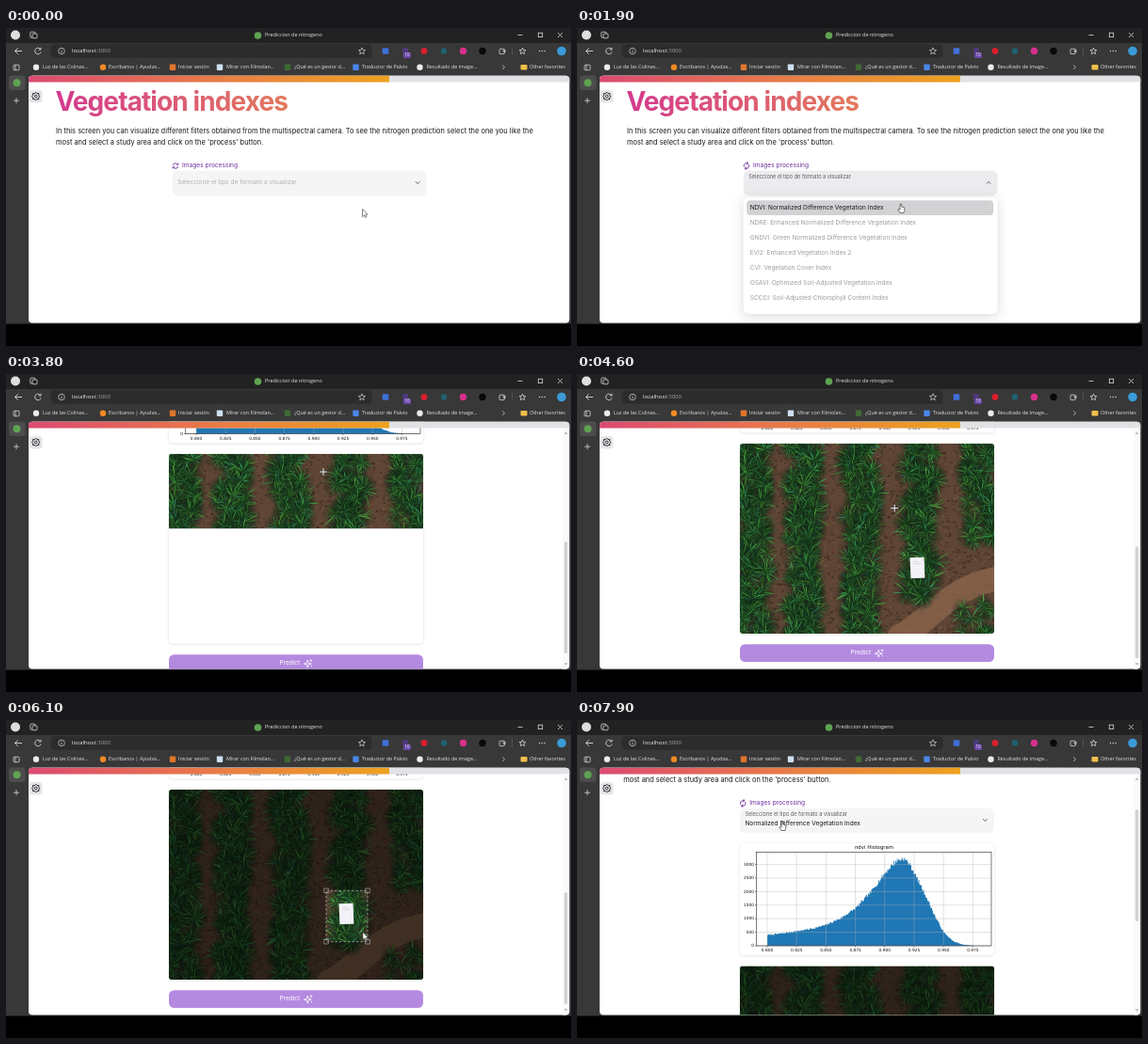
An HTML page with a canvas that plays this animation: 600x338 px, repeating every 8 s.

```html
<!DOCTYPE html>
<html lang="en">
<head>
<meta charset="utf-8">
<title>Vegetation indexes</title>
<style>
html, body { margin: 0; width: 100%; height: 100%; overflow: hidden; background: #000; }
canvas { display: block; width: 600px; height: 338px; }
</style>
</head>
<body>
<canvas id="stage"></canvas>
<script>
const W = 600, H = 338, LOOP = 8000;
const UI = '"Open Sans", "Noto Sans", sans-serif';
const INTER = 'Inter, sans-serif';
const PLOT = '"DejaVu Sans", sans-serif';
const dpr = window.devicePixelRatio || 1;

function makeCanvas(canvas, w, h) {
  canvas.width = Math.round(w * dpr);
  canvas.height = Math.round(h * dpr);
  const ctx = canvas.getContext('2d');
  ctx.scale(dpr, dpr);
  return ctx;
}
const g = makeCanvas(document.getElementById('stage'), W, H);

function seeded(seed) {
  return () => {
    seed = (seed * 1664525 + 1013904223) >>> 0;
    return seed / 4294967296;
  };
}

// ---- drawing helpers ----
function text(str, x, y, size, color, font = INTER, align = 'left', weight = 400) {
  g.font = `${weight} ${size}px ${font}`;
  g.textAlign = align;
  g.textBaseline = 'middle';
  g.fillStyle = color;
  g.fillText(str, x, y);
}
function box(x, y, w, h, r, fill, stroke) {
  g.beginPath();
  g.roundRect(x, y, w, h, r);
  if (fill) { g.fillStyle = fill; g.fill(); }
  if (stroke) { g.strokeStyle = stroke; g.stroke(); }
}
function disc(x, y, r, fill) {
  g.beginPath();
  g.arc(x, y, r, 0, 7);
  g.fillStyle = fill;
  g.fill();
}
function ring(x, y, r, color, a = 0, b = Math.PI * 2) {
  g.beginPath();
  g.arc(x, y, r, a, b);
  g.strokeStyle = color;
  g.stroke();
}
function line(color, width, ...p) {
  g.beginPath();
  g.moveTo(p[0], p[1]);
  for (let i = 2; i < p.length; i += 2) g.lineTo(p[i], p[i + 1]);
  g.strokeStyle = color;
  g.lineWidth = width;
  g.stroke();
}
function star(x, y, R, r, n, color, turn = -Math.PI / 2) {
  g.beginPath();
  for (let i = 0; i < n * 2; i++) {
    const a = turn + i * Math.PI / n, d = i % 2 ? r : R;
    g.lineTo(x + d * Math.cos(a), y + d * Math.sin(a));
  }
  g.closePath();
  g.strokeStyle = color;
  g.stroke();
}

// ---- motion ----
function track(keys, t, smooth) {
  let i = 1;
  while (i < keys.length - 1 && keys[i][0] < t) i++;
  const a = keys[i - 1], b = keys[i];
  let k = Math.min(1, Math.max(0, (t - a[0]) / (b[0] - a[0])));
  if (smooth) k = k * k * (3 - 2 * k);
  return a.slice(1).map((v, j) => v + (b[j + 1] - v) * k);
}
const SCROLL = [[0, 0], [2500, 0], [2850, 119], [3200, 119], [3600, 207], [3800, 234.5],
  [4000, 245.5], [6400, 245.5], [6700, 201.5], [7400, 58]];
const MOUSE = [[0, 379, 197], [400, 379, 197], [900, 360, 166], [1200, 356, 168], [1750, 344, 187],
  [2200, 344, 187], [2850, 340, 174], [3300, 340, 174], [3800, 337, 104], [4500, 337, 140], [5150, 340, 181]];
const DRAG = [[5150, 340, 181], [5400, 371, 213], [5850, 384, 236]];
const LEAVE = [[5850, 384, 236], [6350, 375, 224], [6900, 375, 224], [7800, 218, 108]];
const OPEN = 1000, PICK = 2100, PLOTTED = 2350, LOAD = 3500, GRAB = 5150, DROP = 5900;

const pointer = t => t < GRAB ? track(MOUSE, t, true)
  : t < 5850 ? track(DRAG, t) : track(LEAVE, t, true);

// ---- crop field ----
const FW = 270, FH = 202;
const field = document.createElement('canvas');
(function paintField() {
  const c = makeCanvas(field, FW, FH), rnd = seeded(42);
  const near = n => (rnd() - 0.5) * n;

  function plant(x, y, size) {
    const shade = c.createRadialGradient(x, y, 0, x, y, size * 0.9);
    shade.addColorStop(0, 'rgba(14,34,20,.65)');
    shade.addColorStop(1, 'rgba(14,34,20,0)');
    c.fillStyle = shade;
    c.fillRect(x - size, y - size, size * 2, size * 2);
    const turn = rnd() * 6, blades = 13;
    for (let b = 0; b < blades; b++) {
      const a = turn + b * 6.28 / blades + near(0.3), len = size * (0.5 + rnd() * 0.6);
      const bend = a + near(0.5), wide = 0.5 + rnd() * 0.5;
      const mx = x + Math.cos(a) * len * 0.5, my = y + Math.sin(a) * len * 0.5;
      const nx = -Math.sin(a) * wide, ny = Math.cos(a) * wide;
      const ex = x + Math.cos(bend) * len, ey = y + Math.sin(bend) * len;
      const hue = 105 + rnd() * rnd() * 65, light = 16 + rnd() * 38;
      c.fillStyle = `hsl(${hue} 48% ${light}%)`;
      c.beginPath();
      c.moveTo(x, y);
      c.quadraticCurveTo(mx + nx, my + ny, ex, ey);
      c.quadraticCurveTo(mx - nx, my - ny, x, y);
      c.fill();
    }
  }

  c.fillStyle = '#5f4535';
  c.fillRect(0, 0, FW, FH);
  for (let i = 0; i < 3000; i++) {
    c.fillStyle = rnd() < 0.6 ? 'rgba(30,24,16,.4)' : 'rgba(135,104,80,.3)';
    c.fillRect(rnd() * FW, rnd() * FH, 1 + rnd() * 2, 1 + rnd());
  }
  c.lineCap = 'round';
  c.strokeStyle = 'rgba(142,103,78,.75)';
  c.lineWidth = 26;
  c.beginPath();
  c.moveTo(170, 205);
  c.bezierCurveTo(205, 188, 222, 148, 285, 142);
  c.stroke();

  for (const [cx, end] of [[14, 212], [67, 212], [129, 212], [192, 168], [255, 106]]) {
    for (let y = -8; y < end; y += 5.5)
      for (let k = 0; k < 3; k++) plant(cx + near(32), y + near(8), 11 + rnd() * 7);
  }
  for (let i = 0; i < 14; i++) plant(252 + near(36), 184 + near(38), 13);

  c.translate(188.5, 132);
  c.rotate(-0.04);
  c.fillStyle = '#f4f2f8';
  c.fillRect(-7.5, -11, 15, 22);
  c.fillStyle = '#c9c3cc';
  c.fillRect(-4, -7, 5, 0.7);
  c.fillRect(-4, -4.5, 8, 0.7);
})();

// ---- histogram ----
const CURVE = [[202, 400], [218, 460], [233, 540], [250, 640], [264, 770], [280, 1020], [296, 1400], [312, 2000],
  [327, 2700], [338, 3120], [346, 3230], [352, 3060], [358, 2680], [370, 1850], [380, 1080],
  [389, 500], [399, 170], [409, 45], [421, 5]];
const bars = [], noise = seeded(7);
for (let x = 202; x < 421; x += 0.85) {
  const v = track(CURVE, x)[0];
  bars.push([x, v + (noise() - 0.5) * (v * 0.05 + 30) * Math.min(1, v / 300)]);
}

function histogram(top) {
  const y0 = top + 109, up = v => y0 - v * 0.0288;
  const L = 190.5, R = 440, T = top + 9.5;
  g.beginPath();
  g.moveTo(202, y0);
  for (const [x, v] of bars) { g.lineTo(x, up(v)); g.lineTo(x + 0.85, up(v)); }
  g.lineTo(421, y0);
  g.fillStyle = '#1f77b4';
  g.fill();
  text('ndvi Histogram', 315.5, top + 5, 5.4, '#111', PLOT, 'center');
  for (let i = 0; i < 8; i++) {
    const x = 202 + i * 31.2;
    line('rgba(176,176,176,.75)', 0.5, x, T, x, y0);
    line('#111', 0.5, x, y0, x, y0 + 1.5);
    text((0.8 + i * 0.025).toFixed(3), x, y0 + 5, 4.35, '#111', PLOT, 'center');
  }
  for (let v = 0; v <= 3000; v += 500) {
    line('rgba(176,176,176,.75)', 0.5, L, up(v), R, up(v));
    line('#111', 0.5, L - 1.5, up(v), L, up(v));
    text(String(v), L - 2.5, up(v), 4.35, '#111', PLOT, 'right');
  }
  g.lineWidth = 0.6;
  g.strokeStyle = '#222';
  g.strokeRect(L, T, R - L, y0 - T);
}

// ---- page ----
const ITEMS = ['NDVI: Normalized Difference Vegetation Index', 'NDRE: Enhanced Normalized Difference Vegetation Index',
  'GNDVI: Green Normalized Difference Vegetation Index', 'EVI2: Enhanced Vegetation Index 2',
  'CVI: Vegetation Cover Index', 'OSAVI: Optimized Soil-Adjusted Vegetation Index',
  'SCCCI: Soil-Adjusted Chlorophyll Content Index'];

function card(x, y, w, h) {
  g.save();
  g.shadowColor = 'rgba(0,0,0,.14)';
  g.shadowBlur = 3 * dpr;
  g.shadowOffsetY = 0.5 * dpr;
  box(x, y, w, h, 4, '#fff');
  g.restore();
}

function spinner(x, y, t) {
  g.save();
  g.translate(x, y);
  g.rotate(t / 1000 * Math.PI * 2);
  g.lineWidth = 0.9;
  for (let i = 0; i < 2; i++) {
    ring(0, 0, 2.8, '#6a2c9c', 0.2, 2.7);
    line('#6a2c9c', 0.8, -3.1, 3.1, -2.7, 1, -0.7, 1.4);
    g.rotate(Math.PI);
  }
  g.restore();
}

function select(x, y, t) {
  const open = t >= OPEN && t < PICK, picked = t >= PICK;
  const lift = picked ? 1 : Math.min(1, Math.max(0, (t - OPEN) / 200));
  box(x, y, 270, 26.5, 6, open ? '#ececee' : '#f5f5f6');
  text('Seleccione el tipo de formato a visualizar', x + 5.5, y + 12.7 - 6.1 * lift,
    6.52 - 0.92 * lift, lift > 0.5 ? '#5c5c64' : '#b0b0b6');
  if (picked) text('Normalized Difference Vegetation Index', x + 5.5, y + 16.5, 6.52, '#18181b');
  const d = open ? -1.2 : 1.2, cx = x + 260.5, cy = y + 12.7;
  line('#55555c', 0.9, cx - 2.2, cy - d, cx, cy + d, cx + 2.2, cy - d);
}

function menu(x, y, t) {
  const k = Math.min(1, (t - OPEN) / 150) * Math.min(1, (PICK + 100 - t) / 100);
  g.save();
  g.globalAlpha = k;
  g.save();
  g.shadowColor = 'rgba(0,0,0,.15)';
  g.shadowBlur = 12 * dpr;
  g.shadowOffsetY = 2 * dpr;
  box(x, y, 270, 124, 6, '#fff');
  g.restore();
  const hover = t > 1500;
  if (hover) box(x + 3.5, y + 3.3, 262, 15.7, 4, '#d2d2d5');
  ITEMS.forEach((s, i) => text(s, x + 7, y + 11 + i * 16, 6.52, hover && i === 0 ? '#18181b' : '#9c9ca2'));
  g.restore();
}

function sparkles(x, y) {
  g.lineWidth = 0.8;
  star(x - 0.7, y + 0.6, 4, 1.2, 4, '#fff');
  line('#fff', 0.7, x + 3, y - 4.2, x + 3, y - 1.4);
  line('#fff', 0.7, x + 1.6, y - 2.8, x + 4.4, y - 2.8);
  line('#fff', 0.7, x + 3.4, y + 2.2, x + 3.4, y + 4);
}

function photo(x, y, t) {
  card(x, y, FW, FH);
  const seen = t < 3800 ? Math.max(0, (t - LOAD) / 300 * 79)
    : Math.min(FH, 79 + (t - 3800) / 400 * 123);
  if (seen <= 0) return;
  g.save();
  g.beginPath();
  g.roundRect(x, y, FW, FH, 3);
  g.clip();
  g.beginPath();
  g.rect(x, y, FW, seen);
  g.clip();
  g.drawImage(field, x, y, FW, FH);
  if (t >= GRAB) {
    const [ex, ey] = track(DRAG, t - 50);
    const cx = x + 167, cy = y + 107.4, w = ex - 340, h = (ey - 181) * 0.99;
    g.beginPath();
    g.rect(x, y, FW, FH);
    g.rect(cx, cy, w, h);
    g.fillStyle = 'rgba(0,0,0,.5)';
    g.fill('evenodd');
    g.lineWidth = 0.6;
    g.strokeStyle = 'rgba(30,30,30,.6)';
    g.strokeRect(cx, cy, w, h);
    g.setLineDash([2.5, 2]);
    g.strokeStyle = 'rgba(255,255,255,.85)';
    g.strokeRect(cx, cy, w, h);
    g.setLineDash([]);
    if (t > DROP) {
      for (const hx of [cx, cx + w]) for (const hy of [cy, cy + h])
        box(hx - 2.3, hy - 2.3, 4.6, 4.6, 0, 'rgba(40,40,40,.4)', 'rgba(255,255,255,.65)');
    }
  }
  g.restore();
}

function scrollbar(s) {
  g.fillStyle = '#fafafa';
  g.fillRect(591, 57.5, 7, 257);
  box(592.8, 67.8 + s * 0.47, 3.4, 119, 1.7, '#d2d2d4');
  for (const [y, d] of [[62.5, -1.2], [308.5, 1.2]]) {
    g.beginPath();
    g.moveTo(592.6, y - d);
    g.lineTo(596.4, y - d);
    g.lineTo(594.5, y + d);
    g.fillStyle = '#b4b4b6';
    g.fill();
  }
}

function page(t) {
  const s = track(SCROLL, t)[0], picked = t >= PICK, dx = picked ? -3.8 : 0;
  g.save();
  g.beginPath();
  g.roundRect(24, 50.7, 574.3, 262.8, 4);
  g.clip();
  g.fillStyle = '#fff';
  g.fillRect(24, 50, 575, 265);

  g.save();
  g.translate(0, -s);
  const grad = g.createLinearGradient(53, 0, 300, 0);
  grad.addColorStop(0, '#d43a8e');
  grad.addColorStop(1, '#e37a5c');
  g.letterSpacing = '-0.9px';
  text('Vegetation indexes', 52.5 + dx, 80, 28, grad, INTER, 'left', 700);
  g.letterSpacing = '0px';
  text('In this screen you can visualize different filters obtained from the multispectral camera. ' +
    'To see the nitrogen prediction select the one you like the', 53 + dx, 110, 7.45, '#18181b');
  text("most and select a study area and click on the 'process' button.", 53 + dx, 121.3, 7.45, '#18181b');
  spinner(180 + dx, 146.5, t);
  text('Images processing', 187 + dx, 146.5, 6.6, '#6a2c9c');
  select(176.7 + dx, 151.7, t);
  if (picked) {
    card(173, 189, FW, 119);
    if (t >= PLOTTED) histogram(189);
    photo(173, 319.4, t);
    box(173, 532.7, FW, 18.8, 5.5, '#b48ae0');
    text('Predict', 290.5, 542, 6.52, '#fff');
    sparkles(321, 542);
  }
  if (t >= OPEN && t < PICK + 100) menu(176.7, 180, t);
  g.restore();

  g.fillStyle = '#e2e2e6';
  g.fillRect(24, 50, 575, 7.5);
  const bar = g.createLinearGradient(24, 0, 407, 0);
  bar.addColorStop(0, '#dc4a72');
  bar.addColorStop(0.5, '#e87a48');
  bar.addColorStop(1, '#eda21f');
  g.fillStyle = bar;
  g.fillRect(24, 50, 383, 7.5);

  box(25, 66, 13.5, 13.5, 3.5, '#e6e6e9');
  g.lineWidth = 1;
  star(31.7, 72.6, 4.4, 3.2, 8, '#2a2a2e');
  ring(31.7, 72.6, 1.4, '#2a2a2e');
  if (picked) scrollbar(s);
  g.restore();
}

// ---- browser frame ----
const MARKS = [['Luz de las Colinas...', 39, 32, '#ececec', 1], ['Escríbanos | Ayudas...', 109, 103, '#f08a24', 1],
  ['Iniciar sesión', 183, 177, '#e0752c', 0], ['Mirar con Filmolan...', 234, 227, '#cfe0f2', 0],
  ['¿Qué es un gestor d...', 306, 299, '#3f6a34', 0], ['Traductor de Palvio', 378, 371.5, '#4a86e8', 0],
  ['Resultado de image...', 446.5, 439.5, '#ececec', 1]];

function mark(x, y, r, color, round) {
  if (round) disc(x, y, r, color);
  else box(x - r, y - r, r * 2, r * 2, 0.8, color);
}

function frame() {
  const ink = '#d8d8d8';
  g.fillStyle = '#000';
  g.fillRect(0, 0, W, H);
  g.fillStyle = '#222';
  g.fillRect(0, 0, W, 16);
  g.fillStyle = '#383838';
  g.fillRect(0, 16, W, 298.5);

  disc(10, 7.5, 5, '#dedede');
  g.lineWidth = 0.8;
  box(25.8, 4.2, 5.2, 6, 1, null, ink);
  box(28, 6, 5, 4.8, 1, '#222', ink);
  disc(267.5, 8, 3.8, '#5fa352');
  text('Prediccion de nitrogeno', 275, 8, 5.5, '#e6e6e6', UI);
  line(ink, 0.8, 543.5, 7.5, 548.5, 7.5);
  g.strokeRect(565.3, 5.2, 4.4, 4.4);
  line(ink, 0.8, 586, 5, 591, 10);
  line(ink, 0.8, 591, 5, 586, 10);

  line(ink, 0.9, 17, 24.5, 9.5, 24.5, 12.7, 21.3);
  line(ink, 0.9, 9.5, 24.5, 12.7, 27.7);
  ring(34, 24.5, 3.2, ink, 0.3, 5.6);
  line(ink, 0.9, 37, 20.8, 37, 23, 34.8, 23);
  box(47.5, 17.3, 341, 14.5, 4, '#2c2c2c');
  g.lineWidth = 0.7;
  ring(59, 24.5, 3.3, ink);
  line(ink, 0.8, 59, 24, 59, 26.3);
  line(ink, 0.8, 59, 22.5, 59, 23.2);
  text('localhost', 70, 24.5, 6.1, '#f0f0f0', UI);
  const w = g.measureText('localhost').width;
  text(':3000', 70 + w, 24.5, 6.1, '#a0a0a0', UI);
  g.lineWidth = 0.7;
  star(378, 24.7, 3.8, 1.7, 5, ink);

  mark(403, 24.5, 3.3, '#3f6fd8', 0);
  mark(424, 24, 3, '#4b3a78', 0);
  box(422, 26, 8, 6, 1.5, '#6a48a8');
  text('10', 426, 29, 4.4, '#fff', UI, 'center');
  mark(444, 24.5, 3.4, '#d8202c', 1);
  mark(465, 24.5, 3.2, '#1f6272', 1);
  mark(485.5, 24.5, 3.7, '#d8308c', 1);
  mark(506, 24.5, 3.7, '#080808', 1);
  g.lineWidth = 0.8;
  box(524, 22.2, 5.4, 5.4, 1, null, ink);
  ring(529.2, 24.5, 1.2, ink);
  line('#666', 0.6, 537.5, 20, 537.5, 29);
  g.lineWidth = 0.8;
  star(548.5, 24.7, 3.6, 1.6, 5, ink);
  for (const x of [566.5, 569.3, 572.1]) disc(x, 24.5, 0.7, ink);
  mark(590, 24.5, 4.8, '#3a9bd8', 1);

  for (const [s, x, ix, color, round] of MARKS) {
    mark(ix, 41.7, 3.2, color, round);
    text(s, x, 41.7, 5.4, '#e4e4e4', UI);
  }
  line(ink, 0.8, 527.3, 39.5, 529.5, 41.7, 527.3, 43.9);
  box(546.5, 39, 7, 5.4, 0.8, '#f0c04a');
  text('Other favorites', 556, 41.7, 5.4, '#e4e4e4', UI);

  g.lineWidth = 0.8;
  box(8, 39.2, 6, 5.6, 1, null, ink);
  line(ink, 0.8, 10, 39.2, 10, 44.8);
  box(3, 50.5, 17.5, 15.5, 3, '#4c4c4c');
  disc(11.5, 58.3, 4, '#5fa352');
  line(ink, 0.8, 8, 77.2, 14, 77.2);
  line(ink, 0.8, 11, 74.2, 11, 80.2);
}

// ---- pointer shapes ----
function shape(points, fill, edge) {
  g.beginPath();
  for (let i = 0; i < points.length; i += 2) g.lineTo(points[i], points[i + 1]);
  g.closePath();
  g.fillStyle = fill;
  g.fill();
  g.lineWidth = 0.6;
  g.strokeStyle = edge;
  g.stroke();
}
function cursor(t) {
  const [x, y] = pointer(t);
  const hand = t > 750 && t < 2300 || t > 7600;
  const cross = t > 3650 && t < 6000;
  g.save();
  g.translate(x, y);
  if (cross) {
    line('#222', 1.8, -4, 0, 4, 0);
    line('#222', 1.8, 0, -4, 0, 4);
    line('#fff', 1, -4, 0, 4, 0);
    line('#fff', 1, 0, -4, 0, 4);
  } else if (hand) {
    shape([-0.8, 0, 0.6, 0, 0.8, 3, 3.6, 3.8, 4, 6, 3, 9.5, -1, 9.5, -3.2, 6, -2.4, 5.2, -0.9, 6.2], '#fff', '#222');
  } else {
    shape([-0.5, -4.5, -0.5, 3.6, 1.3, 2, 2.5, 4.5, 3.8, 3.9, 2.7, 1.5, 5, 1.3], '#fff', '#333');
  }
  g.restore();
}

const start = performance.now();
function loop() {
  const t = (performance.now() - start) % LOOP;
  frame();
  page(t);
  cursor(t);
  requestAnimationFrame(loop);
}
loop();
</script>
</body>
</html>
```
